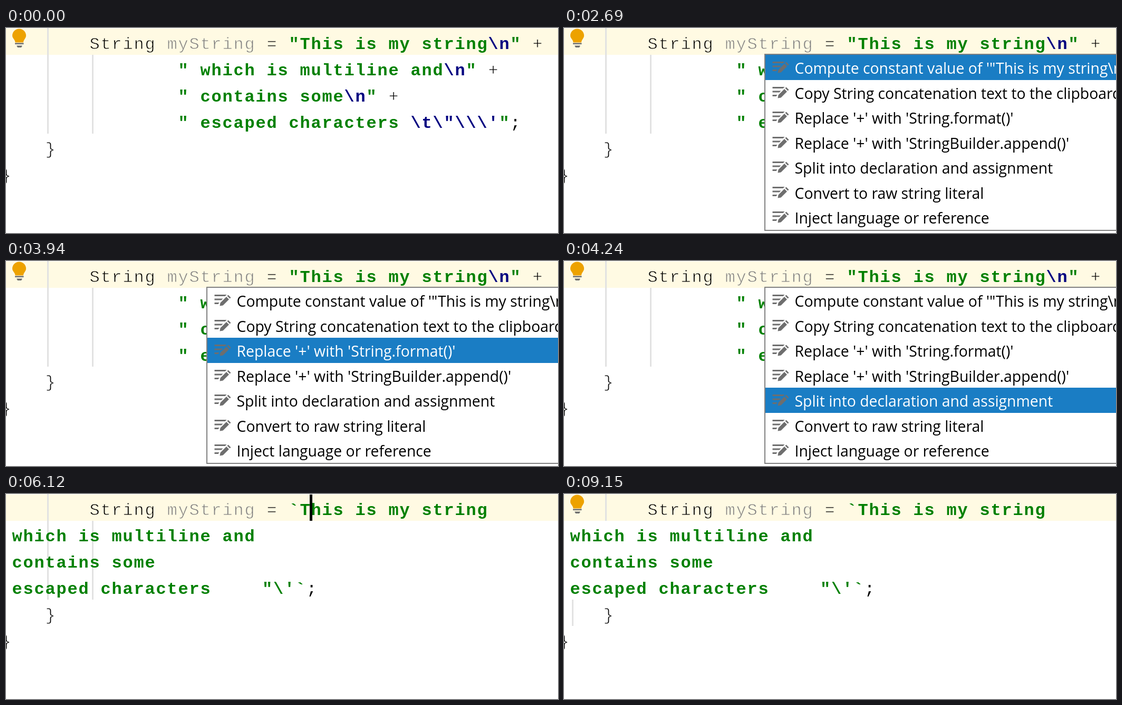
An HTML page for the animation above (9550 ms loop, 1047 by 390 pixels).

```html
<!DOCTYPE html>
<html lang="en">
<head>
<meta charset="utf-8">
<title>Convert to raw string literal</title>
<style>
  html, body { margin: 0; width: 100%; height: 100%; overflow: hidden; background: #fff; }
  svg { display: block; }
  text { white-space: pre; }
  .code { font: 32px "Liberation Mono", "Courier New", monospace; letter-spacing: 1.8px; }
  .str, .esc { font-weight: bold; fill: #008000; }
  .esc { fill: #000080; }
  .plain, .unused { stroke: #fff; stroke-width: .9px; }
  .unused { fill: #808080; }
  .current.plain, .current.unused { stroke: #fffae3; }
  .item { font: 28.35px "Open Sans", "Noto Sans", sans-serif; }
  .guide { fill: #e2e2e2; }
</style>
</head>
<body>
<svg id="stage" width="1047" height="390" viewBox="0 0 1047 390">
  <rect y="1" width="1047" height="50" fill="#fffae3"/>
  <rect class="guide" x="78" width="3" height="51"/>
  <g id="oldGuides" class="guide">
    <rect x="78" y="51" width="3" height="150"/>
    <rect x="163" y="51" width="3" height="150"/>
  </g>
  <rect id="newGuide" class="guide" x="15" y="201" width="3" height="50"/>
  <g id="shared" class="code"></g>
  <g id="before" class="code"></g>
  <g id="after" class="code"></g>
  <g id="bulb">
    <path d="M12 14.5A13 13 0 0 1 38 14.5C38 20 33 22 33 27.5H17.5C17.5 22 12 20 12 14.5Z" fill="#eda200"/>
    <path d="M17 28.5H33.5V31H17ZM20 33.5H31L29 37H22Z" fill="#6e6e6e"/>
  </g>
  <rect id="caret" x="576" y="1" width="5" height="50"/>
  <path id="pointer" d="M-8 1H-3Q0 1 0 4Q0 1 3 1H8M0 4V30M-8 33H-3Q0 33 0 30Q0 33 3 33H8" fill="none" stroke="#000" stroke-width="2"/>
  <g id="menu">
    <rect x="381" y="50" width="680" height="335" fill="#fff" stroke="#808080" stroke-width="2"/>
    <rect id="bar" x="382" width="665" fill="#1a7dc4"/>
  </g>
</svg>
<script>
const LOOP = 9550;
const COL = 21, LEFT = -9.6;
const ROW = 47.5, MENU_TOP = 51;
const $ = id => document.getElementById(id);

function add(parent, tag, attrs, text = "") {
  const el = document.createElementNS("http://www.w3.org/2000/svg", tag);
  for (const key in attrs) el.setAttribute(key, attrs[key]);
  el.textContent = text;
  parent.append(el);
  return el;
}

// Writes consecutive [style, text] runs from a column of a code line.
function write(group, line, col, ...runs) {
  for (const [style, text] of runs) {
    add($(group), "text", {
      x: LEFT + col * COL, y: 40 + line * 50,
      class: line ? style : style + " current"
    }, text);
    col += text.length;
  }
}

write("shared", 0, 8, ["plain", "String "], ["unused", "myString"], ["plain", " ="]);
write("shared", 4, 4, ["plain", "}"]);
write("shared", 5, 0, ["plain", "}"]);

write("before", 0, 26, ["str", '"This is my string'], ["esc", "\\n"], ["str", '"'], ["plain", " +"]);
write("before", 1, 16, ["str", '" which is multiline and'], ["esc", "\\n"], ["str", '"'], ["plain", " +"]);
write("before", 2, 16, ["str", '" contains some'], ["esc", "\\n"], ["str", '"'], ["plain", " +"]);
write("before", 3, 16, ["str", '" escaped characters '], ["esc", "\\t\\\"\\\\\\'"], ["str", '"'], ["end", ";"]);

write("after", 0, 26, ["str", "`This is my string"]);
write("after", 1, 1, ["str", "which is multiline and"]);
write("after", 2, 1, ["str", "contains some"]);
write("after", 3, 1, ["str", "escaped characters"]);
write("after", 3, 23.6, ["str", "\"\\'`"], ["end", ";"]);

const items = [
  "Compute constant value of '\"This is my string\\n\" + ...'",
  "Copy String concatenation text to the clipboard",
  "Replace '+' with 'String.format()'",
  "Replace '+' with 'StringBuilder.append()'",
  "Split into declaration and assignment",
  "Convert to raw string literal",
  "Inject language or reference"
];
const ICON = "M0 0H23L20 3H0ZM0 7.5H16L13 10.5H0ZM0 15H9L7 18H0Z" +
  "M11 15.5L22.5 4L27.5 9L16 20.5L10 21.5ZM24 2.5L26 .5L31 5.5L29 7.5Z";
const rowTop = i => Math.round(MENU_TOP + i * ROW);
const labels = items.map((text, i) => {
  add($("menu"), "path", { d: ICON, fill: "#6e6e6e", transform: `translate(395.5 ${rowTop(i) + 13})` });
  return add($("menu"), "text", { class: "item", x: 437.5, y: rowTop(i) + 36 }, text);
});

// Each track lists [start time, value]; a value holds until the next start.
const tracks = {
  converted: [[0, 0], [6120, 1]],
  reindented: [[0, 0], [6430, 1]],
  bulb: [[0, 1], [1280, 0], [2690, 1], [6120, 0], [6960, 1]],
  caret: [[0, 0], [1280, 1], [2290, 0], [6120, 1], [7130, 0], [7590, 1], [8140, 0], [8670, 1], [9150, 0]],
  selected: [[0, -1], [2690, 0], [3770, 1], [3940, 2], [4090, 3], [4240, 4], [4410, 5], [6120, -1]],
  pointer: [
    [0, null], [360, [815, 103]], [438, [757, 76]], [516, [690, 46]], [594, [620, 18]],
    [672, [571.5, -2]], [750, [576.5, -6]], [900, [582.5, 0]], [1050, [582.5, 6]],
    [1130, [582.5, 10]], [1365, [590.5, 19]], [1450, null]
  ]
};
const at = (name, t) => tracks[name].findLast(([start]) => start <= t)[1];
const show = (id, on) => { $(id).style.display = on ? "" : "none"; };

function draw(t) {
  const converted = at("converted", t), reindented = at("reindented", t);
  show("before", !converted);
  show("after", converted);
  show("oldGuides", !reindented);
  show("newGuide", reindented);
  show("bulb", at("bulb", t));
  show("caret", at("caret", t));

  const pointer = at("pointer", t);
  show("pointer", pointer);
  if (pointer) $("pointer").setAttribute("transform", `translate(${pointer})`);

  const selected = at("selected", t);
  show("menu", selected >= 0);
  if (selected >= 0) {
    $("bar").setAttribute("y", rowTop(selected));
    $("bar").setAttribute("height", rowTop(selected + 1) - rowTop(selected));
    labels.forEach((label, i) => label.setAttribute("fill", i === selected ? "#fff" : "#000"));
  }
}

const begin = performance.now();
function tick() {
  draw((performance.now() - begin) % LOOP);
  requestAnimationFrame(tick);
}
tick();
</script>
</body>
</html>
```
